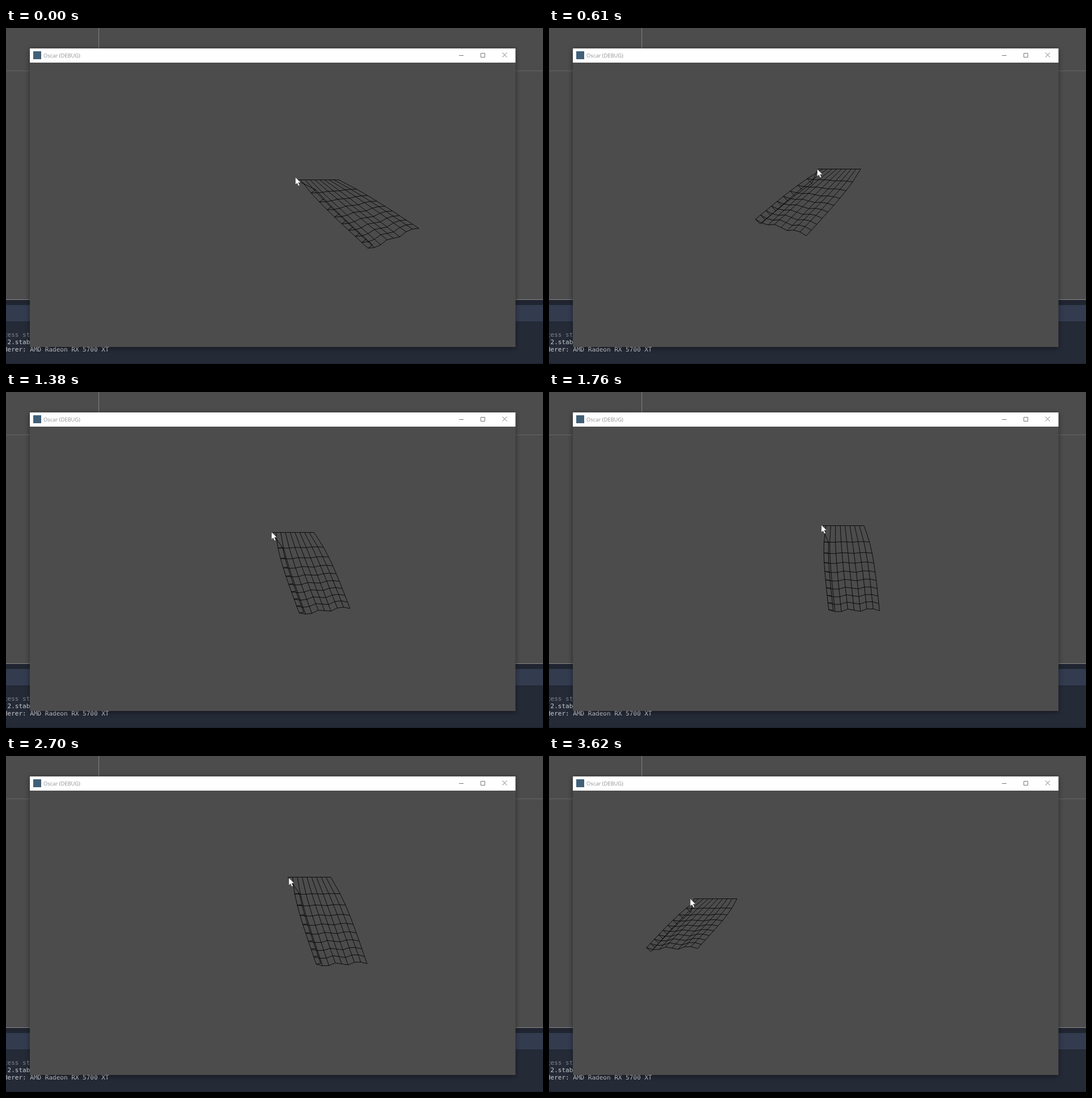
These frames come from a looping animation (946x592 px, 3690 ms). An HTML page:

```html
<!DOCTYPE html>
<html lang="en">
<head>
<meta charset="utf-8">
<title>Cloth</title>
<style>
html, body { margin: 0; height: 100%; overflow: hidden; background: #4c4c4c; }
svg { display: block; }
.log { font: 11px "DejaVu Sans Mono", monospace; fill: #cdcfd2; }
.log .dim { fill: #7f838b; }
.title { font: 9.35px "Open Sans", sans-serif; fill: #8f8f8f; }
.window { filter: drop-shadow(0 2px 4px #0007); }
</style>
</head>
<body>
<svg width="946" height="592" viewBox="0 0 946 592">
  <rect width="946" height="592" fill="#4c4c4c"/>
  <path d="M163.5 0V478" stroke="#808080"/>
  <path d="M0 75.5H946" stroke="#666"/>
  <path d="M0 478.5H946" stroke="#8a8a8a"/>
  <rect y="479" width="946" height="113" fill="#202531"/>
  <rect y="488" width="946" height="29" fill="#333b4f"/>
  <rect y="518" width="946" height="72" fill="#252a37"/>
  <g class="log">
    <text class="dim" x="-4" y="544">cess st</text>
    <text x="2.6" y="557">2.stab</text>
    <text x="-4" y="570">derer: AMD Radeon RX 5700 XT</text>
  </g>
  <g class="window">
    <rect x="42" y="36" width="855.5" height="526" fill="#4c4c4c"/>
    <rect x="42" y="36" width="855.5" height="25" fill="#fff"/>
  </g>
  <rect x="48" y="41" width="14" height="14" fill="#416078"/>
  <text class="title" x="66" y="52">Oscar (DEBUG)</text>
  <path d="M798 48.5h8M836.5 44.5h7v7h-7zM874.5 43.5l8 8M882.5 43.5l-8 8" fill="none" stroke="#777"/>
  <path id="cloth" fill="none" stroke="#000" stroke-width=".85" transform="translate(.5 .5)"/>
  <path id="cursor" d="M0 0V13.5l3-2.8 2.3 5 2.4-1-2.3-5h4.3z" fill="#fff" stroke="#222" stroke-width=".6"/>
</svg>
<script>
const LOOP = 3690, STEPS = 48, SIZE = 10;

// Where the pointer drags the cloth and how far the hem swings:
// step, left corner x and y, lean and drop of the hem.
const keys = [
  [0, 510, 267, 130, 103],
  [2, 506, 247, 145, 118],
  [5, 492, 234, 26, 145],
  [8, 473, 248, -107, 103],
  [14, 465, 245, 30, 128],
  [19, 468, 246, 51, 140],
  [23, 479, 235, 16, 149],
  [30, 475, 221, -57, 147],
  [33, 478, 206, 6, 150],
  [36, 495, 217, 65, 150],
  [40, 404, 229, 29, 107],
  [44, 303, 250, 1, 143],
  [47, 255, 251, -81, 87]
];

function slope(k, n) {
  const a = keys[Math.max(k - 1, 0)], b = keys[Math.min(k + 1, keys.length - 1)];
  return (b[n] - a[n]) / (b[0] - a[0]);
}

// Smooth Hermite motion through the keys.
function poseAt(step) {
  let k = 0;
  while (k < keys.length - 2 && keys[k + 1][0] <= step) k++;
  const a = keys[k], b = keys[k + 1], span = b[0] - a[0];
  const u = (step - a[0]) / span, v = 1 - u;
  const [, x, y, lean, drop] = a.map((p, n) =>
    v * v * (1 + 2 * u) * p + u * u * (3 - 2 * u) * b[n] +
    u * v * span * (v * slope(k, n) - u * slope(k + 1, n)));
  return { x, y, lean, drop };
}

function clothPoint({ x, y, lean, drop, tilt }, c, r) {
  if (!r) return [x + 8.4 * c, y];
  const depth = (r / 9) ** 0.75; // gravity stretches the upper rows most
  const column = Math.max(c, 1) - 5;
  const spacing = 11.2 - 2.8 * (1 - depth) ** 4;
  const ripple = 2.5 * depth * Math.sin(1.9 * column);
  const px = x + 42 + lean * depth + column * spacing;
  const py = y + (drop + tilt * column / 8) * depth + ripple;
  return c ? [px, py] : [px + 8, py + 2 - lean * 0.06]; // left edge folds under
}

function clothPath(pose) {
  const grid = Array.from({ length: SIZE }, (_, r) =>
    Array.from({ length: SIZE }, (_, c) =>
      clothPoint(pose, c, r).map(n => n.toFixed(1)).join(" ")));
  const columns = grid[0].map((_, c) => grid.map(row => row[c]));
  return [...grid, ...columns].map(line => "M" + line.join("L")).join("");
}

const cloth = document.getElementById("cloth");
const cursor = document.getElementById("cursor");

function draw() {
  const time = performance.now() % LOOP;
  const step = Math.min(STEPS - 1, Math.floor((time + 8) * STEPS / LOOP));
  const pose = poseAt(step);
  const speed = poseAt(step + 0.5).x - poseAt(step - 0.5).x;
  pose.y = Math.round(pose.y);
  pose.tilt = 1.6 * speed - 0.28 * pose.lean;
  cloth.setAttribute("d", clothPath(pose));
  const lead = poseAt(step + 0.4); // the pointer runs ahead of the cloth
  cursor.setAttribute("transform", `translate(${lead.x + 0.5} ${lead.y})`);
  requestAnimationFrame(draw);
}
draw();
</script>
</body>
</html>
```
